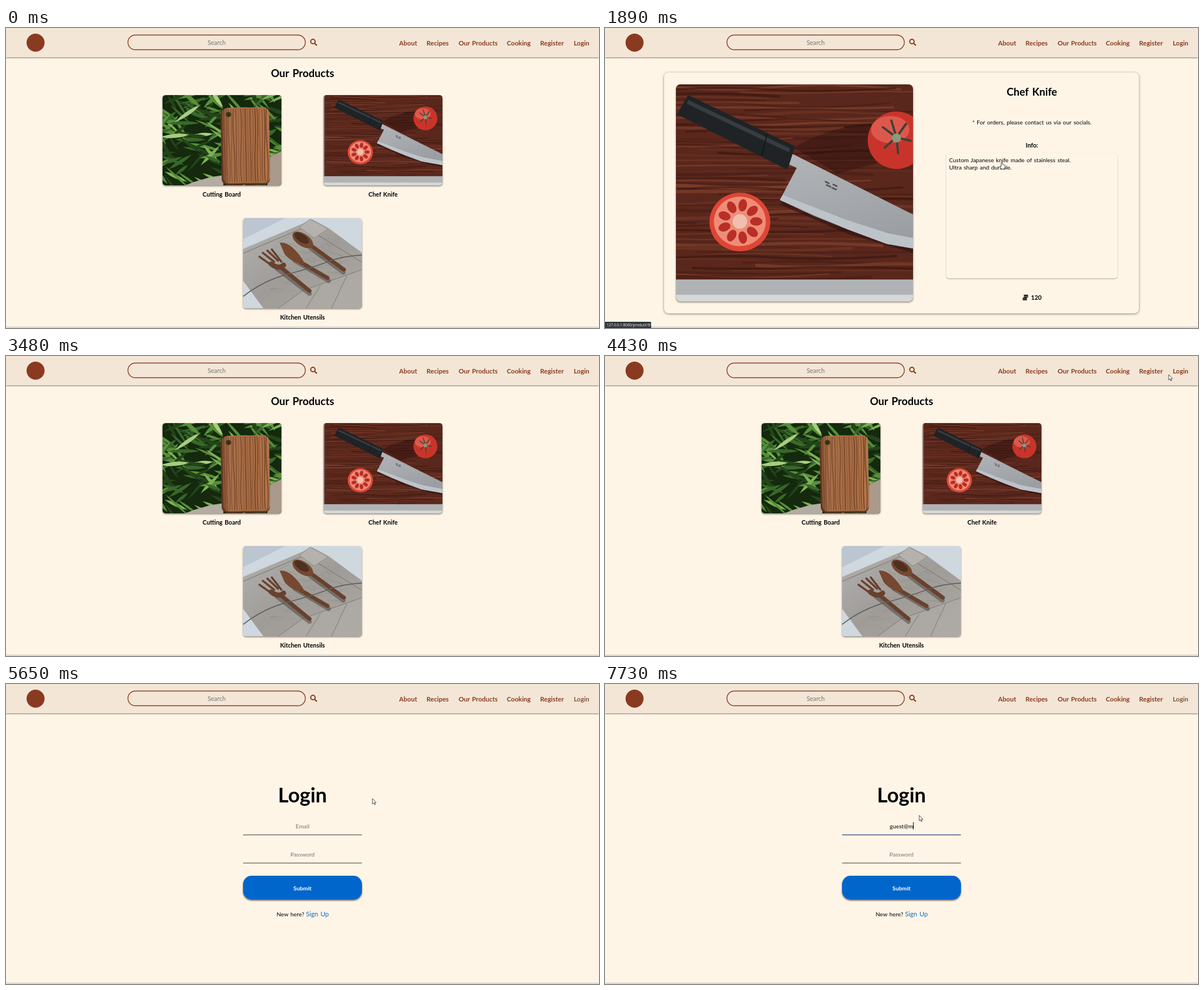
Animation, 1053 px wide and 532 px high, one loop 8 s. Source, as an HTML page:

```html
<!DOCTYPE html>
<html lang="en">
<head>
<meta charset="utf-8">
<title>Kitchen shop</title>
<style>
  html, body { margin: 0; width: 100%; height: 100%; overflow: hidden; background: #fef5e7; }
  body { position: relative; font-family: Lato, sans-serif; }
  body > *, .page > * { position: absolute; }
  .layer, .page { left: 0; top: 0; width: 1053px; height: 532px; overflow: hidden; }
  header { left: 0; top: 0; width: 1053px; height: 52px; background: #f4e6d6; box-shadow: 0 1px 2px #0008; }
  footer { left: 0; top: 531px; width: 1053px; height: 9px; background: #f4e6d6; box-shadow: 0 0 2px #0009; }
  .photo { overflow: hidden; border-radius: 5px; box-shadow: 0 1.5px 3px #0007; }
  .panel { box-sizing: border-box; border-radius: 8px; box-shadow: 0 1px 4px #0007; }
  .button { left: 421px; top: 340px; width: 211px; height: 42px; border-radius: 15px; background: #06c; box-shadow: 0 2px 3px #0009; }
  text { text-anchor: middle; font-size: 10.3px; word-spacing: .1em; }
  .bold { font-weight: 700; }
  .caption { font-weight: 700; font-size: 10.8px; }
  .title { font-weight: 700; font-size: 18.6px; }
  .nav { font-weight: 700; font-size: 11.5px; fill: #8a3a20; }
  .hint { fill: #757575; }
  .start { text-anchor: start; }
</style>
</head>
<body>

<svg width="0" height="0">
  <defs>
    <linearGradient id="oak">
      <stop stop-color="#8a5432"/><stop offset=".15" stop-color="#a8704a"/>
      <stop offset=".6" stop-color="#a56a42"/><stop offset="1" stop-color="#b5774a"/>
    </linearGradient>
    <linearGradient id="cloth" x2="1" y2="1">
      <stop stop-color="#b3b2b0"/><stop offset=".5" stop-color="#9f9c98"/><stop offset="1" stop-color="#aca8a3"/>
    </linearGradient>
    <linearGradient id="steel" x2=".4" y2="1">
      <stop stop-color="#b2b5b8"/><stop offset="1" stop-color="#9a9ea3"/>
    </linearGradient>

    <g id="board">
      <rect width="211" height="161" fill="#14290d"/>
      <g id="leaves"></g>
      <path d="M40 161Q75 147 108 143V161Z" fill="#b3aca3"/>
      <path d="M188 112L211 100V161H186Z" fill="#a99a8b"/>
      <g transform="rotate(-1 148 90)">
        <rect x="104" y="23" width="86" height="137" rx="11" fill="#5d3621"/>
        <rect x="107" y="22" width="83" height="135" rx="10" fill="url(#oak)"/>
        <g id="grain" fill="none" stroke="#5c321d"></g>
        <circle cx="118" cy="34" r="4.3" fill="#26391a" stroke="#5f351c"/>
      </g>
    </g>

    <g id="knife">
      <rect width="508" height="385" fill="#5a271c"/>
      <g id="planks" fill="none"></g>
      <path d="M0 0H5V346H0Z" fill="#77706c"/>
      <path d="M0 346H508V385H0Z" fill="#b0b3b5"/>
      <path d="M0 373H508V385H0Z" fill="#d6d7d6"/>
      <path d="M252 112Q330 70 390 70L400 140L330 158Z" fill="#210e0e" opacity=".35"/>
      <path d="M228 213L348 265L465 299L508 306V290L260 180Z" fill="#210e0e" opacity=".5"/>
      <path d="M248 122L465 231L508 252V299L465 291L418 283L348 257L288 233L228 205L258 148L240 140Z" fill="url(#steel)"/>
      <path d="M228 205L233 196L340 238L420 264L508 281V299L465 291L418 283L348 257Z" fill="#bcc3c9"/>
      <path d="M66 22L252 111L240 148L49 52Z" fill="#1f2326" stroke="#1f2326" stroke-width="5" stroke-linejoin="round"/>
      <path d="M64 31L245 117" stroke="#363c40" stroke-width="7"/>
      <path d="M205 88L196 126" stroke="#11161a" stroke-width="2"/>
      <path d="M308 172l8 4m-6 2l9 4m3 -5l8 4m-10 2l9 4" stroke="#555" stroke-width="3"/>
      <ellipse cx="435" cy="99" rx="51" ry="51" fill="#c9342a"/>
      <ellipse cx="424" cy="80" rx="34" ry="24" fill="#e46557" opacity=".75"/>
      <path d="M435 94l-24 -18M435 94l-21 18M435 94l3 28M435 94l25 6M435 94l17 -24M435 94l-9 -30" stroke="#3f4139" stroke-width="4" stroke-linecap="round"/>
      <circle cx="435" cy="95" r="8" fill="#8d9a78"/>
      <ellipse cx="157" cy="244" rx="54" ry="52" fill="#df4535"/>
      <ellipse cx="157" cy="243" rx="46" ry="44" fill="#ee8d77"/>
      <g id="seeds" fill="#b92e26"></g>
      <circle cx="157" cy="243" r="13" fill="#f0bfae"/>
    </g>

    <g id="utensils">
      <rect width="211" height="161" fill="#cfd7df"/>
      <path d="M0 0H75L0 38Z" fill="#bcc6d0"/>
      <path d="M0 55L108 9L122 2L152 18L211 62V161H36L0 112Z" fill="url(#cloth)"/>
      <g id="weave" stroke="#77736f" stroke-width="1"></g>
      <path d="M0 63L110 16L211 79" fill="none" stroke="#807c78" stroke-width="1.2"/>
      <path d="M100 16L119 2L151 19L126 36Z" fill="#b5b2ad" stroke="#8e8982"/>
      <path d="M63 161L105 130L165 108L211 92V161Z" fill="#b0aca6" opacity=".7"/>
      <path d="M63 161L105 130L211 92M112 161L137 121M157 161L184 103" fill="none" stroke="#7b7772"/>
      <path d="M60 90L118 135M92 76L152 112M120 54L178 97" stroke="#35261f" stroke-width="8" stroke-linecap="round" opacity=".4"/>
      <g stroke="#68412d" stroke-linecap="round" fill="none">
        <path d="M66 87L118 130" stroke-width="7"/>
        <path d="M29 69L50 84M35 62L55 78M43 58L62 76M51 56L68 78" stroke-width="3.6"/>
        <path d="M50 82Q63 92 72 84" stroke-width="9"/>
        <path d="M92 73L150 107M122 50L179 92" stroke-width="7"/>
      </g>
      <path d="M65 44Q82 42 100 66L110 81Q90 83 74 65Z" fill="#75482f"/>
      <ellipse cx="106" cy="39" rx="21" ry="11" transform="rotate(34 106 39)" fill="#75482f"/>
      <ellipse cx="104" cy="36" rx="15" ry="7" transform="rotate(34 104 36)" fill="#4f3020"/>
      <path d="M0 140Q35 112 80 100T150 78T211 66" fill="none" stroke="#625e5a" stroke-width="1.6"/>
    </g>
  </defs>
</svg>

<div class="page" id="list">
  <svg class="photo" style="left:278px;top:118.5px" width="211" height="160" viewBox="0 0 211 161" preserveAspectRatio="none"><use href="#board"/></svg>
  <svg class="photo" style="left:564px;top:118.5px" width="211" height="160" viewBox="0 0 508 385" preserveAspectRatio="xMidYMid slice"><use href="#knife"/></svg>
  <svg class="photo" style="left:421px;top:336.5px" width="211" height="160" viewBox="0 0 211 161" preserveAspectRatio="none"><use href="#utensils"/></svg>
  <svg class="layer">
    <text class="title" x="526.5" y="86.5">Our Products</text>
    <text class="caption" x="383" y="299">Cutting Board</text>
    <text class="caption" x="669.5" y="299">Chef Knife</text>
    <text class="caption" x="526.5" y="517">Kitchen Utensils</text>
  </svg>
</div>

<div class="page" id="product">
  <div class="panel" style="left:105px;top:79px;width:843px;height:427px"></div>
  <div class="panel" style="left:606px;top:222px;width:304px;height:222px;border-radius:5px;box-shadow:0 1px 2px #0005"></div>
  <svg class="photo" style="left:126px;top:100px;border-radius:8px" width="421" height="385" viewBox="0 0 508 385" preserveAspectRatio="xMidYMid slice"><use href="#knife"/></svg>
  <svg class="layer">
    <text class="title" x="758" y="120">Chef Knife</text>
    <text x="758" y="170.5">* For orders, please contact us via our socials.</text>
    <text class="caption" x="758" y="212">Info:</text>
    <text class="start" x="611" y="237.5">Custom Japanese knife made of stainless steal.</text>
    <text class="start" x="611" y="250.5">Ultra sharp and durable.</text>
    <path d="M744.5 474h6M744.5 476.7h6M742.5 479.2h6M742.5 481.8h6" stroke="#000" stroke-width="2" stroke-linecap="round"/>
    <text class="caption" x="766" y="482">120</text>
  </svg>
</div>

<div class="page" id="login">
  <div class="button"></div>
  <svg class="layer">
    <text class="bold" style="font-size:36px" x="526.5" y="210">Login</text>
    <text class="hint" id="emailHint" x="526.5" y="256">Email</text>
    <text id="email" x="526.5" y="256"></text>
    <path id="caret" d="M.5 245V258" stroke="#000"/>
    <path id="emailLine" d="M421 267.5H632" stroke-width="1.3"/>
    <text class="hint" x="526.5" y="306">Password</text>
    <path d="M421 317.5H632" stroke="#767069" stroke-width="1.3"/>
    <text class="bold" fill="#fff" x="526.5" y="365.5">Submit</text>
    <text x="505" y="412">New here?</text>
    <text style="font-size:11.6px" fill="#0a6cca" x="553" y="412">Sign Up</text>
  </svg>
</div>

<header></header>
<footer></footer>
<svg class="layer">
  <circle cx="52.5" cy="26" r="16" fill="#8a3a20"/>
  <rect x="216.5" y="12.5" width="315" height="26" rx="13" fill="none" stroke="#8a3a20" stroke-width="1.4"/>
  <text class="hint" style="font-size:10.9px" x="374" y="30">Search</text>
  <g fill="none" stroke="#8a3a20" stroke-width="2"><circle cx="545" cy="24" r="3.9"/><path d="M548 27L552 31" stroke-width="2.4"/></g>
  <text class="nav" x="714" y="31">About</text>
  <text class="nav" x="766.5" y="31">Recipes</text>
  <text class="nav" x="838.5" y="31">Our Products</text>
  <text class="nav" x="910.5" y="31">Cooking</text>
  <text class="nav" x="969.5" y="31">Register</text>
  <text class="nav" id="loginLink" x="1022" y="31">Login</text>
  <g id="status">
    <path id="statusBox" fill="#323639"/>
    <text class="start" id="statusText" style="font:6.5px 'Open Sans',sans-serif" fill="#fff" x="3" y="529"></text>
  </g>
  <g id="cursor">
    <path id="arrow" d="M0 0V9.6L2.2 7.6L3.7 11L5.2 10.3L3.7 7.1H6.6Z" fill="#fff" stroke="#222" stroke-width=".8"/>
    <path id="hand" d="M-1 1Q0 -.8 1 1V5L5 5.8Q6.2 6 6 8L5 13H-.5L-3 8.5Q-3 7 -1 8.5Z" fill="#fff" stroke="#222" stroke-width=".8"/>
    <path id="beam" d="M-2 -4.5H2M0 -4.5V4.5M-2 4.5H2" fill="none" stroke="#333" stroke-width=".9"/>
  </g>
</svg>

<script>
const LOOP = 8000;
const $ = id => document.getElementById(id);
const show = (id, on) => $(id).style.display = on ? '' : 'none';
const clamp = v => Math.min(1, Math.max(0, v));
const ramp = (t, from, to) => clamp((t - from) / (to - from));

// Photo textures
let seed = 7;
const random = (min, max) => {
  seed = seed * 16807 % 2147483647;
  return min + (max - min) * seed / 2147483647;
};
const fill = (id, count, part) => $(id).innerHTML = Array.from({ length: count }, (_, i) => part(i)).join('');

const greens = ['#24441a', '#38682a', '#578f3a', '#7db055', '#a9cd80'];
fill('leaves', 190, i => {
  const length = random(28, 60), width = random(4, 8);
  const place = `translate(${random(-25, 200)} ${random(-12, 150)}) rotate(${random(-50, 60)})`;
  const shade = greens[Math.floor(random(0, 2.5 + 2.5 * i / 190))];
  return `<path d="M0 0Q${length / 2} ${width} ${length} 0Q${length / 2} ${-width} 0 0" transform="${place}" fill="${shade}"/>`;
});
fill('grain', 19, i => {
  const x = 110 + i * 4.2, bend = random(-6, 6);
  return `<path d="M${x} 24C${x + bend} 70 ${x - bend} 110 ${x} 155" stroke-width="${random(.6, 2.2)}" opacity="${random(.3, .8)}"/>`;
});
fill('planks', 75, i => {
  const y = i * 4.65, bend = random(-9, 9), x = random(-200, 200);
  return `<path d="M${x} ${y}q90 ${bend} 180 0t220 ${bend / 2}" stroke="${i % 2 ? '#8f4a32' : '#32130e'}" stroke-width="${random(1, 6)}" opacity="${random(.2, .6)}"/>`;
});
fill('seeds', 9, i => `<ellipse cx="157" cy="214" rx="7.5" ry="11" transform="rotate(${i * 40 + 10} 157 243)"/>`);
fill('weave', 70, () => {
  const x = random(45, 170), y = random(40, 150), length = random(8, 26);
  return `<path d="M${x} ${y}l${length} ${length * random(-.5, .7)}" opacity="${random(.1, .4)}"/>`;
});

// Pointer: time, x, y, shape from that time on
const pointer = [
  [190, 1011, 499, 'arrow'], [750, 712, 242, 'hand'], [880, 704.5, 237, 'hand'],
  [2150, 704.5, 237, 'beam'], [2350, 698, 258, 'beam'], [3800, 698, 258, 'arrow'],
  [4430, 1001, 33, 'arrow'], [4570, 1024.5, 33, 'arrow'], [4640, 1024.5, 33, 'hand'],
  [5180, 1024.5, 33, 'arrow'], [5850, 550, 249, 'beam'], [5920, 547, 251, 'beam'],
  [5990, 547, 251, 'arrow'], [6150, 558, 233, 'arrow'], [LOOP, 558, 233, 'arrow']
];
const address = 'guest@m';
const keyTimes = [6590, 6860, 6930, 7200, 7330, 7530, 7730];

function drawPointer(t) {
  show('cursor', t >= pointer[0][0]);
  const next = pointer.findIndex(p => p[0] > t);
  if (next < 1) return;
  const [t0, x0, y0, shape] = pointer[next - 1], [t1, x1, y1] = pointer[next];
  const p = ramp(t, t0, t1), k = p * p * (3 - 2 * p);
  $('cursor').setAttribute('transform', `translate(${x0 + (x1 - x0) * k} ${y0 + (y1 - y0) * k})`);
  for (const name of ['arrow', 'hand', 'beam']) show(name, name === shape);
}

function drawStatus(t) {
  const first = t < 3000;
  $('status').style.opacity = first
    ? ramp(t, 960, 1160) - ramp(t, 2150, 2350)
    : ramp(t, 4800, 4980) - ramp(t, 5180, 5400);
  $('statusText').textContent = '127.0.0.1:8000/' + (first ? 'product/9/' : 'profile/login/');
  $('statusBox').setAttribute('d', `M0 521H${first ? 80 : 86}q2 0 2 2V532H0Z`);
}

function drawLogin(t) {
  const focused = t >= 5920;
  const typed = keyTimes.filter(k => k <= t).length;
  $('emailHint').style.opacity = 1 - ramp(t, 5950, 6150);
  $('emailLine').setAttribute('stroke', focused ? '#3c5a8a' : '#767069');
  $('email').textContent = address.slice(0, typed);
  const width = typed ? $('email').getComputedTextLength() : 0;
  $('caret').setAttribute('transform', `translate(${Math.round(526 + width / 2)} 0)`);
  show('caret', focused && (t < 6400 || typed));
}

const start = performance.now();
function frame() {
  const t = (performance.now() - start) % LOOP;
  const page = t >= 4980 ? 'login' : t >= 1890 && t < 3480 ? 'product' : 'list';
  for (const name of ['list', 'product', 'login']) show(name, name === page);
  $('loginLink').style.fill = t >= 4570 ? '#80573f' : '';
  drawStatus(t);
  drawLogin(t);
  drawPointer(t);
  requestAnimationFrame(frame);
}
frame();
</script>
</body>
</html>
```
